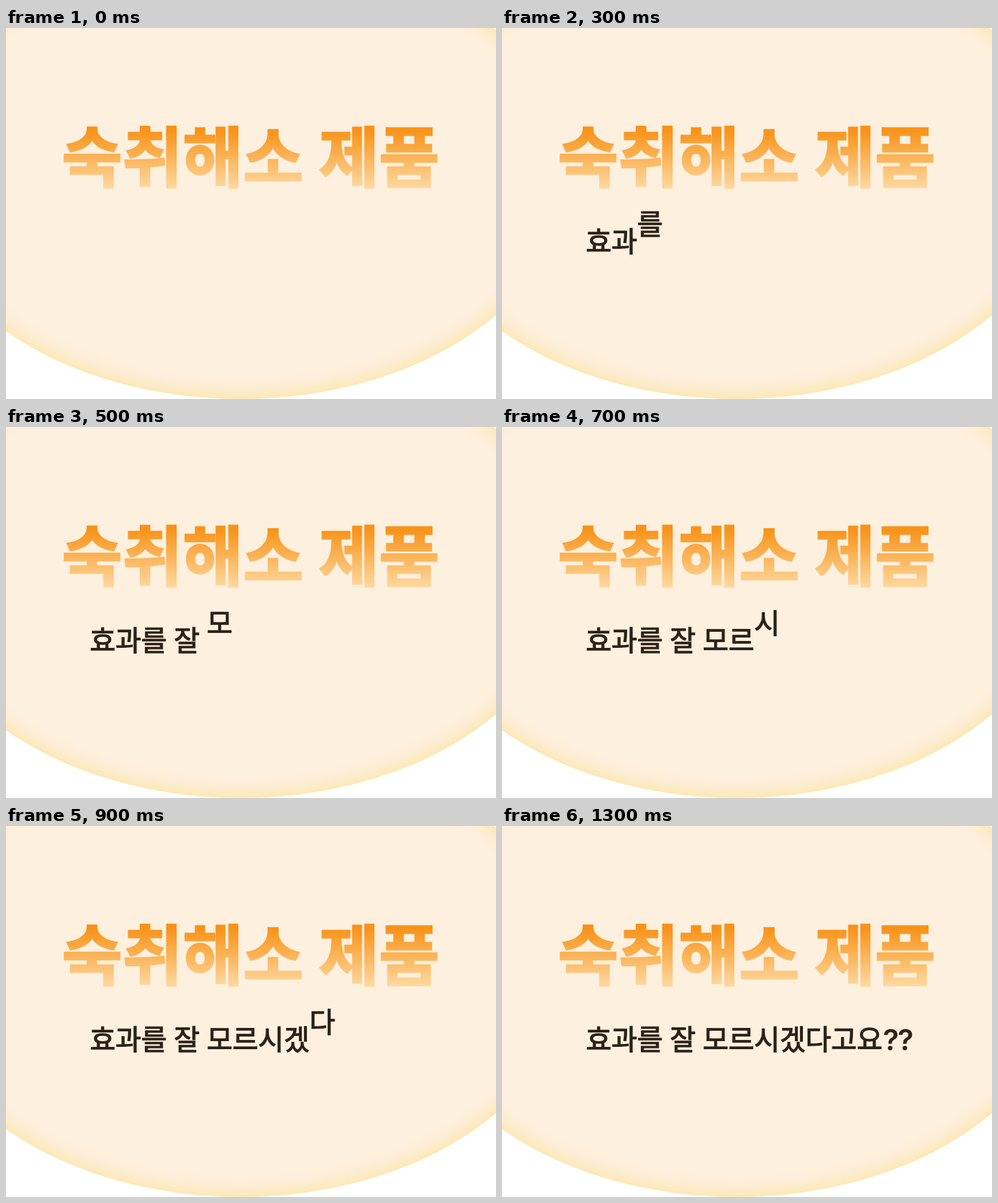
Recreate the animation shown at these times as an HTML page with a canvas. Size 850 by 645 pixels, loop 3.3 s.

```html
<!DOCTYPE html>
<html lang="ko">
<head>
<meta charset="utf-8">
<title>숙취해소 제품</title>
<style>
  html, body { margin: 0; width: 100%; height: 100%; overflow: hidden; background: #fff; }
  canvas { display: block; }
</style>
</head>
<body>
<canvas id="stage" width="850" height="645"></canvas>
<script>
const W = 850, H = 645, LOOP = 3300, STEP = 100, LIFT = 30;
const KR = '"Noto Sans CJK KR", "Noto Sans KR", "Noto Sans CJK", sans-serif';
const LATIN = 'Inter, sans-serif';
const ctx = document.getElementById('stage').getContext('2d');

// Ink box of a glyph in em units
function ink(ch, weight, family) {
  ctx.font = `${weight} 1000px ${family}`;
  const m = ctx.measureText(ch);
  return {
    left: -m.actualBoundingBoxLeft / 1000,
    right: m.actualBoundingBoxRight / 1000,
    top: -m.actualBoundingBoxAscent / 1000,
    bottom: m.actualBoundingBoxDescent / 1000
  };
}

function hasWeight(weight, nearest) {
  const width = w => {
    ctx.font = `${w} 1000px ${KR}`;
    return ctx.measureText('n').width;
  };
  return Math.abs(width(weight) - width(nearest)) > 0.5;
}

// Size and baseline that give one glyph the wanted ink box
function makeStyle(ch, width, top, bottom, weight, family, stroke) {
  const b = ink(ch, weight, family);
  const height = bottom - top;
  const size = Math.sqrt((width - stroke) / (b.right - b.left) *
                         (height - stroke) / (b.bottom - b.top));
  const base = (top + bottom) / 2 - size * (b.top + b.bottom) / 2;
  return { font: `${weight} ${size}px ${family}`, weight, family, size, base, stroke };
}

// Pen position that puts the left ink edge of a glyph at x
function penAt(x, ch, style) {
  return x + style.stroke / 2 - ink(ch, style.weight, style.family).left * style.size;
}

function drawGlyph(c, ch, x, style, color, lift = 0) {
  c.font = style.font;
  c.fillStyle = c.strokeStyle = color;
  c.fillText(ch, x, style.base - lift);
  if (style.stroke) {
    c.lineWidth = style.stroke;
    c.lineJoin = 'miter';
    c.miterLimit = 3;
    c.strokeText(ch, x, style.base - lift);
  }
}

function placeWords(words, start, pitch) {
  return words.flatMap(([text, offset]) =>
    [...text].map((ch, i) => ({ ch, x: start + offset + i * pitch })));
}

const heavy = makeStyle('숙', 100, 171.5, 280, 900, KR, hasWeight(900, 700) ? 0 : 3.2);
const medium = makeStyle('과', 43.4, 348.2, 393.6, 500, KR, hasWeight(500, 400) ? 0.3 : 1.3);
const mark = { font: `600 51px ${LATIN}`, weight: 600, family: LATIN, size: 51, base: 390, stroke: 0 };

const title = placeWords([['숙취해소', 0], ['제품', 445.3]], penAt(99.3, '숙', heavy), 104.7);
const line = placeWords([['효과를', 0], ['잘', 146], ['모르시겠다고요', 203]],
                        penAt(147, '효', medium), 44.5)
  .map(g => ({ ...g, style: medium }));
const markX = penAt(662.4, '?', mark);
line.push({ ch: '?', x: markX, style: mark }, { ch: '?', x: markX + 25.4, style: mark });

function makeBackdrop() {
  const canvas = document.createElement('canvas');
  canvas.width = W;
  canvas.height = H;
  const c = canvas.getContext('2d');
  c.fillStyle = '#fff';
  c.fillRect(0, 0, W, H);

  const disc = new Path2D();
  disc.ellipse(407, 251.5, 570, 393.5, 0, 0, Math.PI * 2);
  c.fillStyle = '#fef0df';
  c.fill(disc);

  // Soft yellow glow inside the rim
  c.save();
  c.clip(disc);
  const outside = new Path2D();
  outside.rect(-400, -400, W + 800, H + 800);
  outside.addPath(disc);
  c.filter = 'blur(18px)';
  c.fillStyle = '#fce08c';
  c.fill(outside, 'evenodd');
  c.restore();

  const fade = c.createLinearGradient(0, 178, 0, 281);
  fade.addColorStop(0, '#f89319');
  fade.addColorStop(1, '#fedaa3');
  for (const g of title) drawGlyph(c, g.ch, g.x, heavy, fade);
  return canvas;
}

const backdrop = makeBackdrop();

function draw() {
  const step = Math.floor(performance.now() % LOOP / STEP);
  const shown = Math.min(step, line.length);
  ctx.drawImage(backdrop, 0, 0);
  for (let i = 0; i < shown; i++) {
    const { ch, x, style } = line[i];
    const raised = i === shown - 1 && shown < line.length;
    drawGlyph(ctx, ch, x, style, '#2c2319', raised ? LIFT : 0);
  }
  requestAnimationFrame(draw);
}
draw();
</script>
</body>
</html>
```
